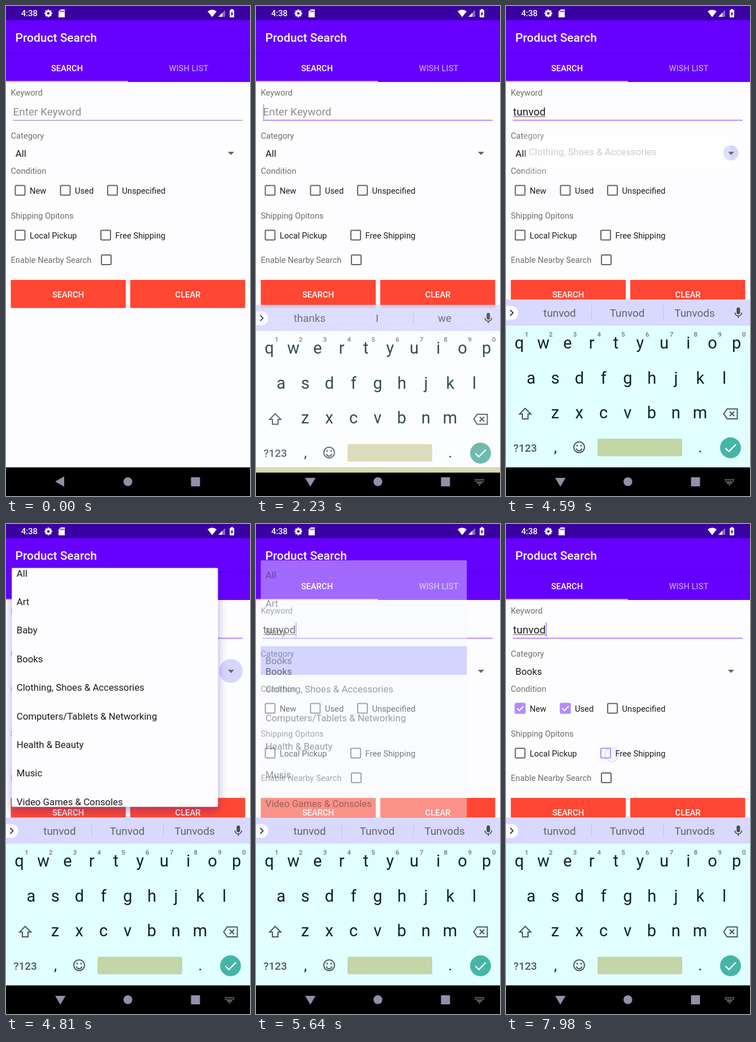
Write an HTML page with a canvas that moves like this. It is 432x864 px and loops after 8 s.

```html
<!DOCTYPE html>
<html lang="en">
<head>
<meta charset="utf-8">
<title>Product Search</title>
<style>
html, body { margin: 0; width: 100%; height: 100%; overflow: hidden; background: #fdfdff; }
canvas { display: block; width: 432px; height: 864px; }
</style>
</head>
<body>
<canvas id="stage"></canvas>
<script>
const W = 432, H = 864, LOOP = 8000;
const WORD = "tunvod", BRAND = "Tunvod";
const PURPLE = "#b48cff", GRAY = "#6e6e68", INK = "#1c1c1c", PAPER = "#fdfdff";
const ITEMS = ["All", "Art", "Baby", "Books", "Clothing, Shoes & Accessories",
  "Computers/Tablets & Networking", "Health & Beauty", "Music", "Video Games & Consoles"];
const TYPED = [2760, 2880, 3070, 3290, 3380, 3460];

const canvas = document.getElementById("stage");
const dpr = window.devicePixelRatio || 1;
canvas.width = W * dpr;
canvas.height = H * dpr;
const c = canvas.getContext("2d");

const ramp = (t, a, b) => Math.min(1, Math.max(0, (t - a) / (b - a)));
const easeOut = u => 1 - (1 - u) * (1 - u);

function rect(x, y, w, h, color, r = 0) {
  c.fillStyle = color;
  c.beginPath();
  c.roundRect(x, y, w, h, r);
  c.fill();
}

function disc(x, y, r, color) {
  c.fillStyle = color;
  c.beginPath();
  c.arc(x, y, r, 0, 7);
  c.fill();
}

function poly(points, color) {
  c.fillStyle = color;
  c.beginPath();
  points.forEach(p => c.lineTo(p[0], p[1]));
  c.fill();
}

function line(points, color, width, close) {
  c.strokeStyle = color;
  c.lineWidth = width;
  c.beginPath();
  points.forEach(p => c.lineTo(p[0], p[1]));
  if (close) c.closePath();
  c.stroke();
}

function text(s, x, y, size, color, align = "left", weight = 400) {
  c.font = `${weight} ${size}px Roboto, sans-serif`;
  c.textAlign = align;
  c.fillStyle = color;
  c.fillText(s, x, y);
}

function statusBar() {
  rect(0, 0, W, 25, "#3b00a2");
  text("4:38", 27, 18, 14.7, "#fff", "left", 500);
  // settings gear
  for (let i = 0; i < 8; i++) {
    const a = i * Math.PI / 4;
    line([[75, 13], [75 + 6.8 * Math.cos(a), 13 + 6.8 * Math.sin(a)]], "#fff", 3);
  }
  disc(75, 13, 5.2, "#fff");
  disc(75, 13, 2.3, "#3b00a2");
  // memory card
  poly([[97, 6], [104, 6], [104, 20], [93, 20], [93, 10]], "#fff");
  [97, 99.5, 102].forEach(x => rect(x - 0.6, 8, 1.2, 3, "#3b00a2"));
  // wifi, signal, battery
  c.fillStyle = "#fff";
  c.beginPath();
  c.moveTo(365, 19.5);
  c.lineTo(357, 9.5);
  c.quadraticCurveTo(365, 3.5, 373, 9.5);
  c.fill();
  poly([[376, 19], [388, 19], [388, 7]], "#8a66cc");
  poly([[376, 19], [383, 19], [383, 12]], "#fff");
  rect(396, 7, 8, 13, "#fff", 1);
  rect(398, 5.5, 4, 2, "#fff");
  poly([[401, 9], [397.5, 14.5], [399.6, 14.5], [399, 18.5], [402.6, 12.8], [400.5, 12.8]], "#3b00a2");
}

function header() {
  rect(0, 25, W, 109, "#6600ff");
  rect(0, 84, W, 1, "#5300d6");
  text("Product Search", 16.5, 63, 21, "#fff", "left", 500);
  text("SEARCH", 108, 115, 14.7, "#fff", "center", 500);
  text("WISH LIST", 323.5, 115, 14.7, "#bd93ff", "center", 500);
  rect(0, 132, 216, 2, "#cbb0ff");
}

// start: when the box is tapped; tx, ty: touch point
function checkbox(t, x, y, label, start = Infinity, tx = 0, ty = 0) {
  const cx = x + 9, cy = y + 9, d = t - start;
  if (d >= 0 && d < 520) {
    const k = ramp(d, 40, 260);
    const px = tx + (cx - tx) * k, py = ty + (cy - ty) * k;
    const r = Math.min(21, 10.5 + 0.035 * d);
    disc(px, py, r, `rgba(140,130,255,${0.4 * ramp(d, 40, 140) * (1 - ramp(d, 300, 520))})`);
    c.strokeStyle = `rgba(175,160,255,${0.6 * (1 - ramp(d, 60, 150))})`;
    c.lineWidth = 1;
    c.stroke();
  }
  c.strokeStyle = d >= 0 ? PURPLE : "#66665a";
  c.lineWidth = 2;
  c.beginPath();
  c.roundRect(x + 0.5, y + 0.5, 17, 17, 1.5);
  c.stroke();
  if (d > 80) {
    const hole = 15 * (1 - ramp(d, 80, 185));
    rect(x - 0.5, y - 0.5, 19, 19, PURPLE, 2);
    if (hole > 0) rect(cx - hole / 2, cy - hole / 2, hole, hole, PAPER);
    const k = ramp(d, 190, 330);
    if (k > 0) {
      const a = Math.min(1, k * 3), b = Math.max(0, (k - 1 / 3) * 1.5);
      const pts = [[x + 3.5, y + 9], [x + 3.5 + 4 * a, y + 9 + 4 * a]];
      if (b > 0) pts.push([x + 7.5 + 7.5 * b, y + 13 - 7.8 * b]);
      line(pts, "#fff", 2);
    }
  }
  if (label) text(label, x + 26, y + 15, 14.7, INK);
}

function cursorOn(t) {
  return t >= 1800 && t < 4410 || t >= 5490 && t < 5990 || t >= 6490 && t < 6990 || t >= 7490;
}

function form(t) {
  rect(0, 134, W, 680, PAPER);
  text("Keyword", 8.5, 158, 14.7, GRAY);
  const word = WORD.slice(0, TYPED.filter(k => t >= k).length);
  if (word) text(word, 12.6, 193, 18.9, INK);
  else text("Enter Keyword", 12.6, 193, 18.9, "#8c8c8c");
  const w = word ? c.measureText(word).width : 0;
  if (word) rect(13, 194.5, w, 1, "#444");
  if (t < 1800) rect(12, 201, 407, 1, "#8080b4");
  else rect(12, 200.5, 407, 2, PURPLE);
  if (cursorOn(t)) rect(12.6 + w, 173.5, 1.8, 26, PURPLE);

  text("Category", 8.5, 234, 14.7, GRAY);
  if (t >= 4550 && t < 4900) {
    c.globalAlpha = 1 - ramp(t, 4810, 4900);
    disc(398, 259, 8 + 13 * easeOut(ramp(t, 4550, 4720)), "#d8d6ff");
    c.globalAlpha = 1;
  }
  text(t < 5520 ? "All" : "Books", 16.8, 266, 16.8, INK);
  poly([[392.8, 257], [404, 257], [398.4, 262.8]], "#6b6b55");

  text("Condition", 8.5, 296, 14.7, GRAY);
  checkbox(t, 16, 316, "New", 7060, 25, 325);
  checkbox(t, 96, 316, "Used", 6350, 104, 324);
  checkbox(t, 179.5, 316, "Unspecified");
  text("Shipping Opitons", 8.5, 374.5, 14.7, GRAY);
  checkbox(t, 16, 395, "Local Pickup");
  checkbox(t, 167.5, 395, "Free Shipping", 7930, 188, 407);
  text("Enable Nearby Search", 8.5, 453, 14.7, GRAY);
  checkbox(t, 168.5, 438.5);

  rect(8.5, 483, 203.5, 49.5, "#ff4733");
  rect(220, 483, 203.5, 49.5, "#ff4733");
  text("SEARCH", 110, 513.5, 14.7, "#fff", "center", 500);
  text("CLEAR", 322, 513.5, 14.7, "#fff", "center", 500);
}

function hints(t) {
  if (t < 2760) return ["thanks", "I", "we"];
  if (t < 3070) return [WORD.slice(0, t < 2880 ? 1 : 2), "", ""];
  const n = t < 3380 ? 3 : t < 3940 ? 5 : 6;
  return [WORD.slice(0, n), BRAND, BRAND + "s"];
}

function keyboard(t) {
  if (t < 1950) return;
  const off = 86 * (1 - easeOut(ramp(t, 1950, 2370)));
  const settled = t >= 2370;
  const ink = settled ? "#10241f" : "#14343c", soft = "#4c5756";
  c.save();
  c.globalAlpha = ramp(t, 1950, 2270);
  c.translate(0, off);
  rect(0, 563, W, 250, settled ? "#e1ffff" : "#fcfdff");
  if (!settled) rect(0, 813 - off, W, off, "#dadaae");

  rect(0, 517.5, W, 46, "#d9d9ff");
  rect(-14, 529, 35.5, 24.5, "#fdfdff", 12);
  line([[7.5, 536], [12.5, 541], [7.5, 546]], "#333", 1.8);
  hints(t).forEach((s, i) => text(s, 95 + 119.5 * i, 547.5, 18.9, "#61616c", "center"));
  if (t >= 3070) rect(151, 528, 1, 25, "#c4c4ea");
  rect(278, 528, 1, 25, "#c6c6c8");
  rect(408.3, 531.5, 6, 12, "#4a4a48", 3);
  c.strokeStyle = "#4a4a48";
  c.lineWidth = 1.7;
  c.beginPath();
  c.arc(411.3, 540.5, 6, 0, Math.PI);
  c.stroke();
  rect(410.5, 546, 1.7, 4, "#4a4a48");

  const row = (keys, x, y) => [...keys].forEach((k, i) =>
    text(k, x + i * 42.75, y, 29, ink, "center"));
  row("qwertyuiop", 23.5, 604);
  row("asdfghjkl", 44.5, 665.5);
  row("zxcvbnm", 87, 727);
  [..."1234567890"].forEach((n, i) =>
    text(n, 36.5 + i * 42.75, 583, 11.5, "#707074", "center", 500));

  line([[34, 709.5], [44, 719.5], [39, 719.5], [39, 728], [29, 728], [29, 719.5], [24, 719.5]], soft, 2, true);
  line([[385.5, 719], [391.5, 710.5], [409.5, 710.5], [409.5, 728], [391.5, 728]], soft, 2, true);
  line([[396, 715], [404, 723]], soft, 2.2);
  line([[404, 715], [396, 723]], soft, 2.2);

  text("?123", 34, 785.5, 19, soft, "center", 500);
  text(",", 87.5, 787, 26, ink, "center");
  text(".", 344, 787, 26, ink, "center");
  c.strokeStyle = soft;
  c.lineWidth = 2;
  c.beginPath();
  c.arc(129.5, 778, 9.5, 0, 7);
  c.stroke();
  c.beginPath();
  c.arc(129.5, 779, 5.2, 0.25, Math.PI - 0.25);
  c.stroke();
  disc(126, 775, 1.5, soft);
  disc(133, 775, 1.5, soft);
  rect(162, 763, 150, 31, settled ? "#c4d5a8" : "#d9d9b4", 3);
  disc(397.5, 779, 18.5, settled ? "#45b5a7" : "#5bb1a6");
  line([[388.5, 779.5], [394.5, 785.5], [407, 773]], "#fff", 2.4);
  c.restore();
}

function popup(t) {
  if (t < 4580 || t >= 5730) return;
  const p = easeOut(ramp(t, 4580, 4900));
  const fade = 1 - ramp(t, 5520, 5730);
  const alpha = ramp(t, 4570, 4670) * fade;
  const dx = 25 * (1 - p), dy = -37 * (1 - p);
  const left = 8.3 + dx, top = 238 - 174 * p, tall = 43 + 410 * p;
  c.save();
  c.globalAlpha = alpha;
  if (alpha === 1) {
    c.shadowColor = "rgba(50,30,160,.4)";
    c.shadowBlur = 16 * dpr;
    c.shadowOffsetY = 6 * dpr;
  }
  rect(left, top, 365, tall, fade < 1 ? "#f4f8ff" : PAPER, 2);
  c.shadowColor = "transparent";
  c.beginPath();
  c.rect(left, top, 365, tall);
  c.clip();
  if (t >= 5290) {
    // the pressed row tints whatever lies below it
    c.save();
    c.globalAlpha = Math.min(1, fade * 2.4);
    c.globalCompositeOperation = "multiply";
    c.beginPath();
    c.rect(8, 215.5, 366, 50.5);
    c.clip();
    disc(190, 241, 30 + 170 * easeOut(ramp(t, 5290, 5500)), "#d8d8ff");
    c.restore();
  }
  ITEMS.forEach((s, i) => text(s, 16.8 + dx, 95.5 + i * 50.4 + dy, 16.8, INK));
  c.restore();
}

function navIcons(t) {
  const color = "#918faa";
  if (t < 1950) poly([[87, 838.5], [103, 829.5], [103, 847.5]], color);
  else {
    poly([[87, 832], [105.5, 832], [96.2, 847.5]], color);
    for (let i = 0; i < 12; i++)
      rect(387.5 + (i % 6) * 2.9, 834 + (i > 5 ? 3 : 0), 1.8, 1.8, color);
    rect(391, 840, 9.5, 1.8, color);
    poly([[393.5, 843.5], [398, 843.5], [395.7, 845.8]], color);
  }
  disc(215.8, 838.7, 7.8, color);
  rect(327.5, 831, 16, 16, color, 1);
}

function draw(now) {
  const t = now % LOOP;
  c.setTransform(dpr, 0, 0, dpr, 0, 0);
  form(t);
  header();
  statusBar();
  popup(t);
  rect(0, 813.5, W, 50.5, "#000");
  keyboard(t);
  navIcons(t);
}

const begin = performance.now();
function tick() {
  draw(performance.now() - begin);
  requestAnimationFrame(tick);
}
tick();
</script>
</body>
</html>
```
